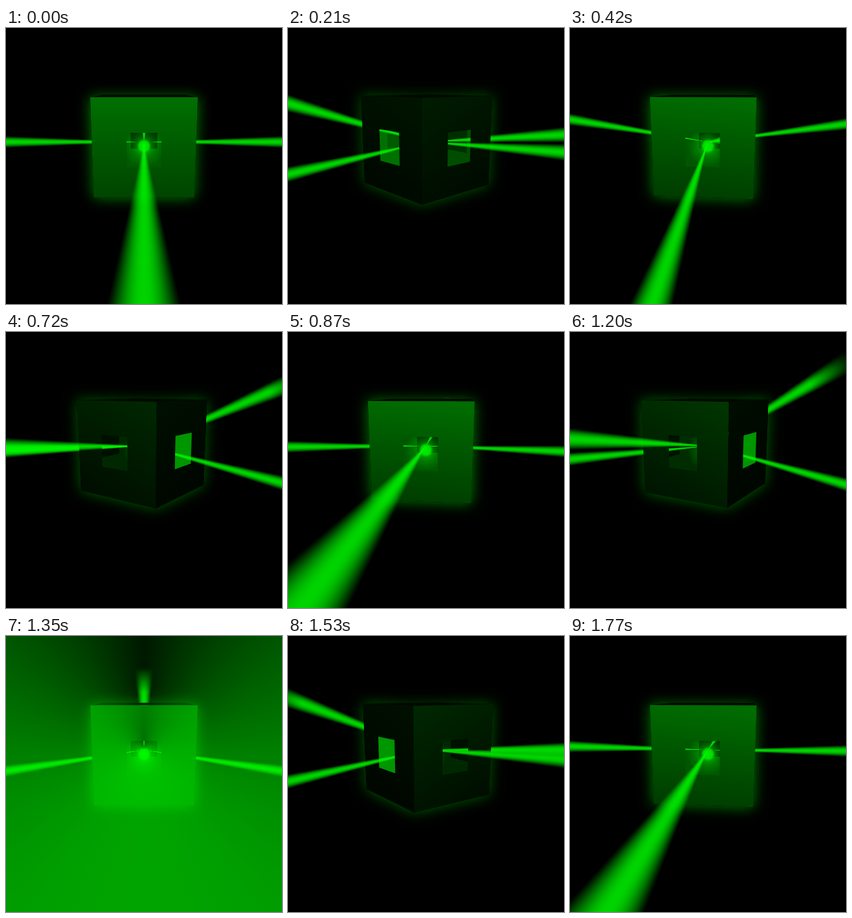
Animation, 400 px wide and 400 px high, one loop 1.8 s. Source, as an HTML page with a canvas:

```html
<!DOCTYPE html>
<html lang="en">
<head>
<meta charset="utf-8">
<title>Cube with rotating light beams</title>
<style>
html, body { margin: 0; width: 100%; height: 100%; overflow: hidden; background: #000; }
canvas { display: block; width: 400px; height: 400px; }
</style>
</head>
<body>
<canvas id="stage" width="400" height="400"></canvas>
<script>
const SIZE = 400, FRAMES = 60, FRAME_MS = 30;
const FOCAL = 483, PITCH = 0.232, EYE_Y = 1.18, EYE_Z = 7.32;
const BASE_Y = -0.96, BEAM_LENGTH = 22;
const { sin, cos, min, max, abs, hypot, atan2, PI } = Math;

const ctx = document.getElementById('stage').getContext('2d');
const layer = document.createElement('canvas');
layer.width = layer.height = SIZE;
const lctx = layer.getContext('2d');

const green = v => `rgb(0,${Math.round(v)},0)`;
const clamp = v => min(1, max(0, v));

function project([x, y, z]) {
  const a = EYE_Z - z, b = EYE_Y - y;
  const depth = a * cos(PITCH) + b * sin(PITCH);
  const up = a * sin(PITCH) - b * cos(PITCH);
  return { x: 200 + FOCAL * x / depth, y: 200 - FOCAL * up / depth, depth };
}

const source = project([0, 0, 0]);

function polygon(points) {
  const path = new Path2D();
  points.map(project).forEach((p, i) => i ? path.lineTo(p.x, p.y) : path.moveTo(p.x, p.y));
  path.closePath();
  return path;
}

// Rectangle of half-width h on the cube side that faces azimuth a
function panel(a, h, top, bottom) {
  const corner = (u, v) => [sin(a) + u * cos(a), v, cos(a) - u * sin(a)];
  return polygon([corner(-h, top), corner(h, top), corner(h, bottom), corner(-h, bottom)]);
}

function makeSide(k, theta) {
  let a = theta + k * PI / 2;
  a = atan2(sin(a), cos(a));
  const swing = 0.155 * sin(theta) - 0.035 * sin(2 * theta);
  const dy = k % 2 ? -swing : swing;
  const along = r => project([r * sin(a), r * dy, r * cos(a)]);
  const distance = p => hypot(p.x - source.x, p.y - source.y);

  const near = along(0.01), tip = along(BEAM_LENGTH);
  // Sine of the angle between the beam and the line of sight
  const off = distance(near) / 0.01 / (FOCAL / source.depth);
  return {
    a,
    angle: atan2(near.y - source.y, near.x - source.x),
    front: EYE_Z * cos(a) > 1,
    spread: 0.043 * max(off, 0.0075) ** -0.9,
    exit: distance(along(1)),
    reach: tip.depth < 0.3 ? 4000 : distance(tip),
    face: panel(a, 1, 1, BASE_Y),
    hole: panel(a, 1 / 3, 1 / 3, -1 / 3),
    light: 16 + 96 * max(0, cos(a)) ** 6
  };
}

function drawBeam({ angle, spread, reach }) {
  const { x, y } = source;
  const half = min(spread, PI), peak = 215 - 15 * min(spread, 3.4);
  const cone = lctx.createConicGradient(angle + PI, x, y);
  for (let i = -10; i <= 10; i++) {
    const d = i / 10 * half;
    cone.addColorStop(0.5 + d / (2 * PI), green(peak * max(0, 1 - (d / spread) ** 2) ** 1.2));
  }
  lctx.globalCompositeOperation = 'copy';
  lctx.fillStyle = cone;
  lctx.fillRect(0, 0, SIZE, SIZE);

  const fade = lctx.createLinearGradient(x, y, x + reach * cos(angle), y + reach * sin(angle));
  fade.addColorStop(0, '#000');
  fade.addColorStop(0.7, '#000');
  fade.addColorStop(1, 'transparent');
  lctx.globalCompositeOperation = 'destination-in';
  lctx.fillStyle = fade;
  lctx.fillRect(0, 0, SIZE, SIZE);

  ctx.globalCompositeOperation = 'screen';
  ctx.drawImage(layer, 0, 0);
  ctx.globalCompositeOperation = 'source-over';
}

function drawGlow() {
  const glow = ctx.createRadialGradient(200, 171, 0, 200, 171, 30);
  [[0, 235], [0.22, 215], [0.36, 90], [0.6, 45], [1, 0]].forEach(([t, v]) => glow.addColorStop(t, green(v)));
  ctx.globalCompositeOperation = 'screen';
  ctx.fillStyle = glow;
  ctx.fillRect(165, 136, 70, 70);
  ctx.globalCompositeOperation = 'source-over';
}

function drawWindow(side, back) {
  const oblique = clamp((abs(side.a) * 180 / PI - 36) / 18);
  const wall = max(40, side.light * 0.8);
  ctx.save();
  ctx.clip(side.hole);
  ctx.fillStyle = green(wall + (150 - wall) * oblique);
  ctx.fillRect(0, 0, SIZE, SIZE);
  ctx.fillStyle = `rgba(0,0,0,${0.6 * (1 - oblique)})`;
  back.forEach(s => ctx.fill(s.hole));
  back.forEach(drawBeam);
  drawGlow();
  ctx.restore();
}

// Inside the cube a beam shows only through its window
function drawFrontBeam(side) {
  ctx.save();
  if (side.spread < 1) {
    const beyond = new Path2D();
    beyond.rect(side.exit, -999, 1999, 1998);
    const region = new Path2D(side.hole);
    region.addPath(beyond, new DOMMatrix().translate(source.x, source.y).rotate(side.angle * 180 / PI));
    ctx.clip(region);
  }
  drawBeam(side);
  ctx.restore();
}

// Faces are brightest at the top, towards the middle of the stage
function drawFace({ a, face, light }) {
  const lean = 80 * sin(a);
  const shade = ctx.createLinearGradient(200 - lean, 100, 200 + lean, 250);
  shade.addColorStop(0, green(light));
  shade.addColorStop(1, green(light * (0.6 - 0.45 * abs(sin(a)))));
  ctx.fillStyle = shade;
  ctx.fill(face);
}

function draw(frame) {
  const theta = frame / FRAMES * 2 * PI;
  const sides = [0, 1, 2, 3].map(k => makeSide(k, theta));
  const front = sides.filter(s => s.front), back = sides.filter(s => !s.front);
  const lid = polygon(sides.map(({ a }) => [sin(a) + cos(a), 1, cos(a) - sin(a)]));

  ctx.fillStyle = '#000';
  ctx.fillRect(0, 0, SIZE, SIZE);

  const body = new Path2D();
  front.forEach(s => body.addPath(s.face));
  ctx.save();
  ctx.shadowBlur = 20;
  ctx.shadowColor = green(70 + 0.5 * max(...front.map(s => s.light)));
  ctx.fill(body);
  ctx.restore();

  back.forEach(drawBeam);

  ctx.fillStyle = green(8);
  ctx.fill(lid);

  front.forEach(s => {
    drawFace(s);
    drawWindow(s, back);
  });
  front.forEach(drawFrontBeam);
}

let shown = -1;
function tick() {
  const frame = Math.floor(performance.now() / FRAME_MS) % FRAMES;
  if (frame !== shown) draw(shown = frame);
  requestAnimationFrame(tick);
}
tick();
</script>
</body>
</html>
```
